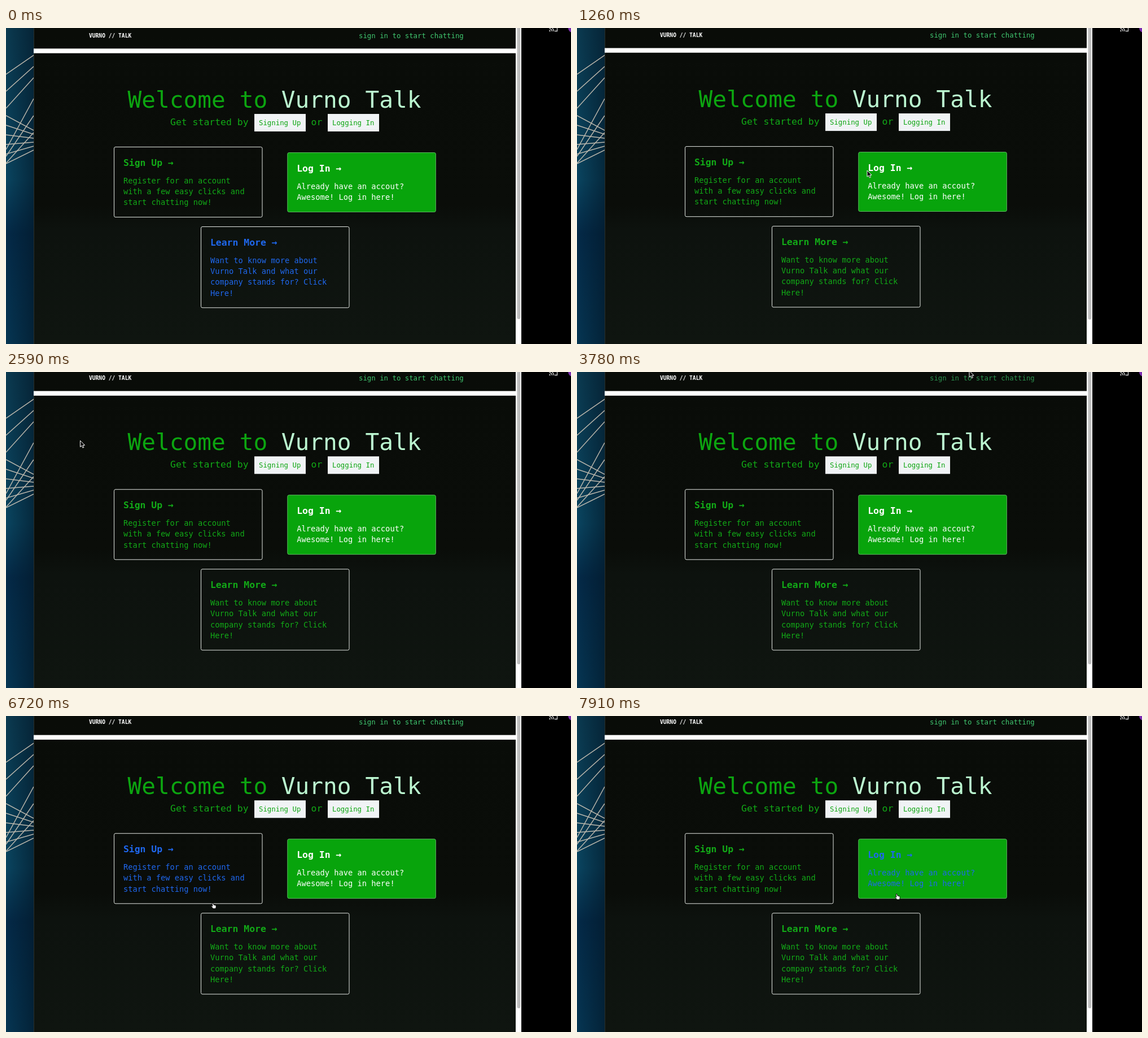
An HTML page for the animation above (8 s loop, 1001 px wide and 559 px high).

```html
<!DOCTYPE html>
<html lang="en">
<head>
<meta charset="utf-8">
<title>Chat landing page</title>
<style>
  html, body { margin: 0; width: 100%; height: 100%; overflow: hidden; background: #000; }
  svg { display: block; width: 100vw; height: 100vh; }
  text { font-family: "DejaVu Sans Mono", Menlo, monospace; white-space: pre; }
  .bold { font-weight: 700; }
</style>
</head>
<body>
<svg viewBox="0 0 1001 559" preserveAspectRatio="none">
  <defs>
    <linearGradient id="sea" x2="0" y2="1">
      <stop offset="0" stop-color="#0b3a50"/>
      <stop offset=".48" stop-color="#0a4560"/>
      <stop offset=".65" stop-color="#042a48"/>
      <stop offset="1" stop-color="#063653"/>
    </linearGradient>
    <linearGradient id="shade">
      <stop offset="0" stop-color="#021626" stop-opacity="0"/>
      <stop offset="1" stop-color="#021626" stop-opacity=".6"/>
    </linearGradient>
    <linearGradient id="night" x2="0" y2="1">
      <stop offset="0" stop-color="#090c08"/>
      <stop offset=".56" stop-color="#0a0d09"/>
      <stop offset=".64" stop-color="#0d120e"/>
      <stop offset="1" stop-color="#0f1510"/>
    </linearGradient>
    <clipPath id="strip"><path d="M0 0h49v559H0z"/></clipPath>
  </defs>

  <g clip-path="url(#strip)">
    <path d="M0 0h49v559H0z" fill="url(#sea)"/>
    <path d="M0 0h49v559H0z" fill="url(#shade)"/>
    <g id="rays" stroke="#dccfbe" stroke-width="1.5" opacity=".85"></g>
  </g>

  <path d="M49 0h854v559H49z" fill="url(#night)"/>
  <path d="M49.5 0v559" stroke="#2a302c"/>
  <g id="page"></g>

  <path d="M903 0h10v559h-10z" fill="#fff"/>
  <rect id="thumb" x="905.5" y="-10" width="6" height="525" rx="3" fill="#bfbfbf"/>
  <g fill="none" stroke="#d5d5d5" stroke-width="1.3">
    <path d="M962.5 1a5 5 0 0 1 5 5M962.5 -2a8 8 0 0 1 8 8M972 5.5h4.5V-1"/>
  </g>
  <circle cx="963.5" cy="5" r="1.2" fill="#d5d5d5"/>
  <circle cx="1004" cy="0" r="8" fill="#7b2fb0"/>

  <g id="cursor" stroke-linejoin="round">
    <path id="arrow" d="M0 0v11.2l2.6-2.4 1.8 4 2-.9-1.8-3.8h3.5z" fill="#000" stroke="#fff"/>
    <path id="cross" d="M-1.5-5h3v3.5H5v3H1.5V5h-3V1.5H-5v-3h3.5z" fill="#fff" stroke="#000"/>
    <path id="hand" d="M2 1.2q1-1 2 0l1 2.9 3.1.6q1 .3 1 1.5v2.6l-1 2H4L.7 6.7q0-1.3 1.4-.8l1 .6z" fill="#fff" stroke="#000" stroke-width=".9"/>
  </g>
</svg>

<script>
const LOOP = 8000, STEP = 70, SCROLL = 2.74;
const CARD_WIDTH = 262.5, PADDING = 16.4;
const GREEN = [18, 170, 23], WHITE = [255, 255, 255], BLUE = [31, 104, 238];
const MINT = [64, 200, 112], DIM_MINT = [44, 148, 80];

const $ = id => document.getElementById(id);
const page = $("page");
const clamp = v => Math.max(0, Math.min(1, v));
const lerp = (a, b, k) => a + (b - a) * k;
const ease = k => k * k * (3 - 2 * k);
const mix = (a, b, k) => `rgb(${a.map((c, i) => Math.round(lerp(c, b[i], k)))})`;

function add(parent, tag, attrs, label = "") {
  const el = document.createElementNS("http://www.w3.org/2000/svg", tag);
  for (const key in attrs) el.setAttribute(key, attrs[key]);
  el.textContent = label;
  return parent.appendChild(el);
}

const write = (x, y, size, label, attrs, parent = page) =>
  add(parent, "text", { x, y, "font-size": size, ...attrs }, label);
const box = (x, y, width, height, attrs) => add(page, "rect", { x, y, width, height, ...attrs });

// Light rays: one set rising to the right, one narrowing towards it
const ray = (y1, y2) => add($("rays"), "line", { x1: 0, x2: 49, y1, y2 });
for (let i = 0; i < 3; i++) ray(82 + 30 * i, 48 + 20 * i);
for (let i = 0; i < 6; i++) ray(155 + 17 * i, 181 + 7 * i);
for (let i = 0; i < 3; i++) ray(215 + 12 * i, 125 + 30 * i);

const hovers = [];

function card(x, y, title, lines, colour, frame) {
  const height = 66.5 + lines.length * 19.2;
  box(x, y, CARD_WIDTH, height, { rx: 2.5, ...frame });
  const el = add(page, "g", {});
  write(x + PADDING, y + 33.5, 16.46, title, { class: "bold" }, el);
  lines.forEach((line, i) => write(x + PADDING, y + 64.5 + i * 19.2, 13.72, line, {}, el));
  hovers.push({ el, x: x + PADDING, y, w: CARD_WIDTH - 2 * PADDING, h: height,
    normal: colour, active: BLUE, hand: true });
}

function button(x, label) {
  const area = { x, y: 152, w: 91, h: 31 };
  box(area.x, area.y, area.w, area.h, { fill: "#f0f3f5" });
  write(x + 8, 172, 12.35, label, { fill: "#0ca510" });
  return area;
}

box(49, 36.4, 854, 8.2, { fill: "#fff" });
write(147, 16.5, 9.62, "VURNO // TALK", { fill: "#fff", class: "bold" });
hovers.push({ el: write(625, 17.5, 12.35, "sign in to start chatting"),
  x: 625, y: 0, w: 186, h: 24, normal: MINT, active: DIM_MINT });
write(215.5, 141, 41.15, "Welcome to", { fill: "#0ca510" });
write(487.8, 141, 41.15, "Vurno Talk", { fill: "#bbf7d0" });
write(291, 172, 16.46, "Get started by", { fill: "#12aa17" });
write(540.5, 172, 16.46, "or", { fill: "#12aa17" });
const buttons = [button(440, "Signing Up"), button(570, "Logging In")];

const outline = { fill: "none", stroke: "#e4e8e4" };
card(191.5, 210.5, "Sign Up →",
  ["Register for an account", "with a few easy clicks and", "start chatting now!"], GREEN, outline);
card(498.8, 220.5, "Log In →",
  ["Already have an accout?", "Awesome! Log in here!"], WHITE, { fill: "#08a40c", stroke: "#5fb862" });
card(345.5, 351.5, "Learn More →",
  ["Want to know more about", "Vurno Talk and what our", "company stands for? Click", "Here!"], GREEN, outline);

// Pointer moves: start time and destination; each takes 1 ms per pixel
const moves = [
  [490, 476, 385], [980, 514, 252], [1400, 222, 24], [2450, 12, 250], [2760, 385, 127],
  [3290, 695, -2], [3990, 559, 75], [4620, 494, 185], [5110, 492, 159], [5320, 363, 312],
  [6650, 363, 330], [6790, 500, 440], [7210, 563, 314]
];

function pointerAt(t) {
  let x = 476, y = 430;
  for (const [start, toX, toY] of moves) {
    if (t < start) break;
    const k = ease(clamp((t - start) / Math.hypot(toX - x, toY - y)));
    x = lerp(x, toX, k);
    y = lerp(y, toY, k);
  }
  return [x, y];
}

function inside(area, t) {
  const [x, y] = pointerAt(t);
  const top = area.y - SCROLL;
  return x >= area.x && x <= area.x + area.w && y >= top && y <= top + area.h;
}

function draw(now) {
  const t = Math.floor(now % LOOP / STEP) * STEP;
  const scroll = SCROLL * clamp((t - 1190) / (3 * STEP));
  page.setAttribute("transform", `translate(0 ${-scroll})`);
  $("thumb").setAttribute("height", 525 + scroll * .7);

  let shape = buttons.some(b => inside(b, t)) ? "cross" : "arrow";
  for (const area of hovers) {
    const k = (inside(area, t) + inside(area, t - STEP)) / 2;
    area.el.setAttribute("fill", mix(area.normal, area.active, k));
    if (area.hand && k) shape = "hand";
  }

  for (const id of ["arrow", "cross", "hand"]) $(id).style.display = id === shape ? "" : "none";
  $("cursor").style.display = t < moves[0][0] ? "none" : "";
  $("cursor").setAttribute("transform", `translate(${pointerAt(t)})`);
}

const start = performance.now();
function tick() {
  draw(performance.now() - start);
  requestAnimationFrame(tick);
}
tick();
</script>
</body>
</html>
```
